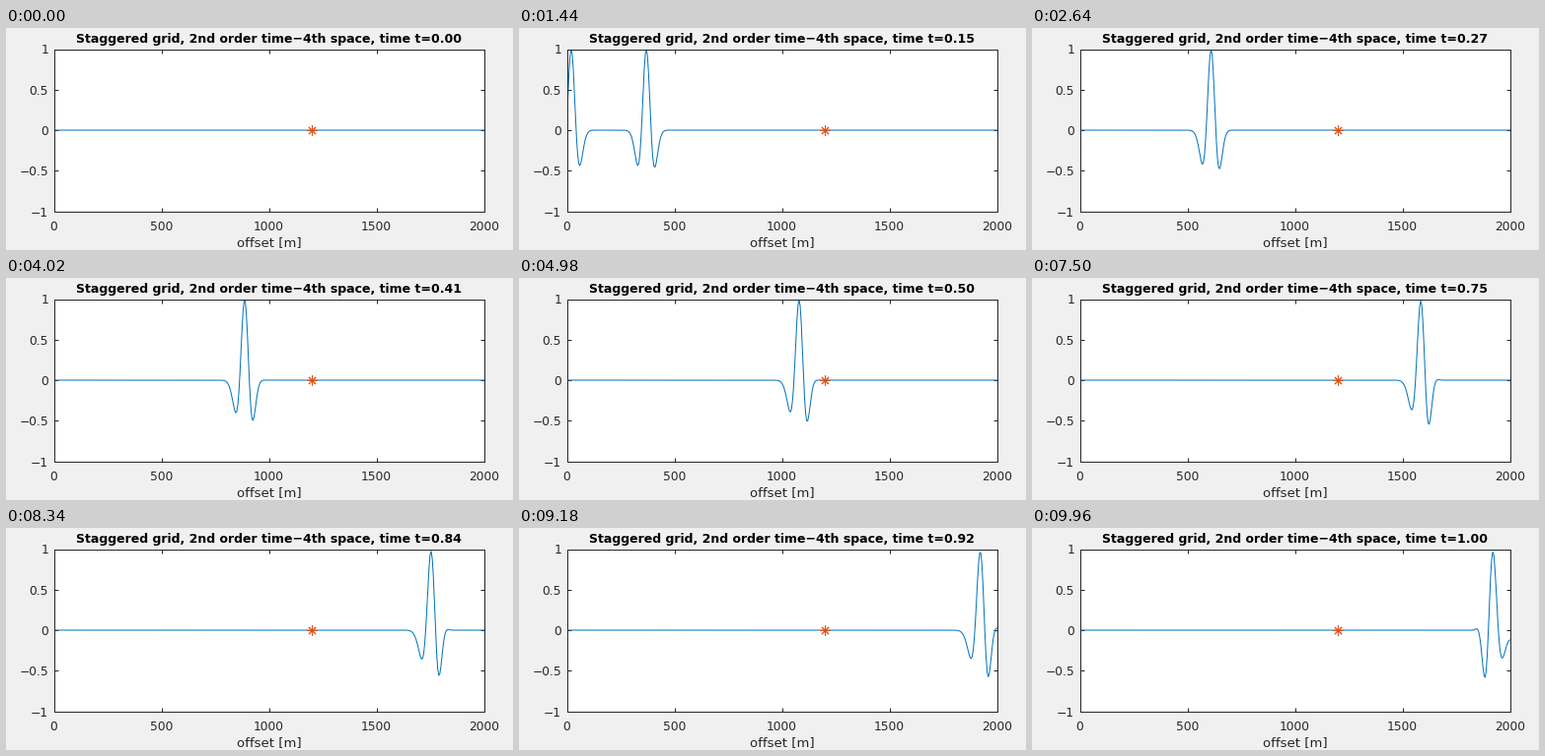
A matplotlib script for the animation above (9.99 s loop, 514 px wide and 226 px high).

```python
import numpy as np
import matplotlib.pyplot as plt
from matplotlib.animation import FuncAnimation

W, H, DPI = 514, 226, 64  # a power of two keeps the pixel size exact
FRAMES, INTERVAL = 333, 30
PX = 72 / DPI  # points per pixel
INK, BLUE, ORANGE = "#262626", "#0072BD", "#D95319"

plt.rcParams["font.family"] = "DejaVu Sans"

# Acoustic wave model: pressure on the nodes, velocity half a cell to the right
SPEED, DX, DT = 2000.0, 5.0, 0.0015
STEPS_PER_FRAME = 2
PEAK_FREQ = 20.0
DELAY = 1.2 / PEAK_FREQ
X_MIN, X_MAX = -1200.0, 2000.0  # the margin left of zero lets waves leave
SOURCE_X, RECEIVER_X = 195.0, 1200.0
C1, C2 = 9 / 8, -1 / 24


def ricker(t):
    q = (np.pi * PEAK_FREQ * (t - DELAY)) ** 2
    return (1 - 2 * q) * np.exp(-q)


def node(x):
    return int(round((x - X_MIN) / DX))


def simulate():
    """Pressure between 0 and X_MAX for every frame."""
    size = node(X_MAX) + 1
    courant = SPEED * DT / DX
    p, v = np.zeros(size), np.zeros(size - 1)
    source, start = node(SOURCE_X), node(0)
    history = []
    for step in range(1, FRAMES * STEPS_PER_FRAME + 1):
        # rigid ends: pressure mirrors evenly, velocity oddly
        e = np.concatenate(([p[1]], p, [p[-2]]))
        v -= courant * (C1 * (e[2:-1] - e[1:-2]) + C2 * (e[3:] - e[:-3]))
        o = np.concatenate((-v[1::-1], v, -v[:-3:-1]))
        p -= courant * (C1 * (o[2:-1] - o[1:-2]) + C2 * (o[3:] - o[:-3]))
        p[source] += 2 * courant * ricker((step - 0.5) * DT)
        if step % STEPS_PER_FRAME == 0:
            history.append(p[start:].copy())
    return history


waves = simulate()
offsets = np.arange(len(waves[0])) * DX
receiver = int(RECEIVER_X / DX)

fig = plt.figure(figsize=(W / DPI, H / DPI), dpi=DPI, facecolor="#F0F0F0")
left, right, top, bottom = 48.5, 484.5, 21.5, 186.5
ax = fig.add_axes([left / W, 1 - bottom / H, (right - left) / W, (bottom - top) / H])
ax.set(xlim=(0, 2000), ylim=(-1, 1))
ax.set_xticks(range(0, 2001, 500))
ax.set_yticks([-1, -0.5, 0, 0.5, 1], ["−1", "−0.5", "0", "0.5", "1"])
ax.tick_params(direction="in", top=True, right=True, length=4.4 * PX, width=PX,
               color=INK, labelcolor=INK, labelsize=12.2 * PX)
ax.tick_params(axis="x", pad=9 * PX)
ax.tick_params(axis="y", pad=5.5 * PX)
for spine in ax.spines.values():
    spine.set(color=INK, linewidth=PX)

middle = (left + right) / 2 / W
fig.text(middle, 1 - 222.5 / H, "offset [m]", size=13.3 * PX, color=INK,
         ha="center", va="baseline")
title = fig.text(middle, 1 - 14.7 / H, "", size=12.5 * PX, weight="bold",
                 color="black", ha="center", va="baseline")

curve, = ax.plot([], [], color=BLUE, linewidth=PX, snap=False)
star, = ax.plot([], [], linestyle="none", marker=(8, 2, 0), color=ORANGE,
                markersize=10 * PX, markeredgewidth=PX, zorder=3)


def draw(frame):
    wave = waves[frame]
    curve.set_data(offsets, wave)
    star.set_data([RECEIVER_X], [wave[receiver]])
    time = (frame + 1) * 3 / 1000
    title.set_text(f"Staggered grid, 2nd order time−4th space, time t={time:.2f}")
    return curve, star, title


anim = FuncAnimation(fig, draw, frames=FRAMES, interval=INTERVAL,
                     repeat=True, repeat_delay=0)
plt.show()
```
